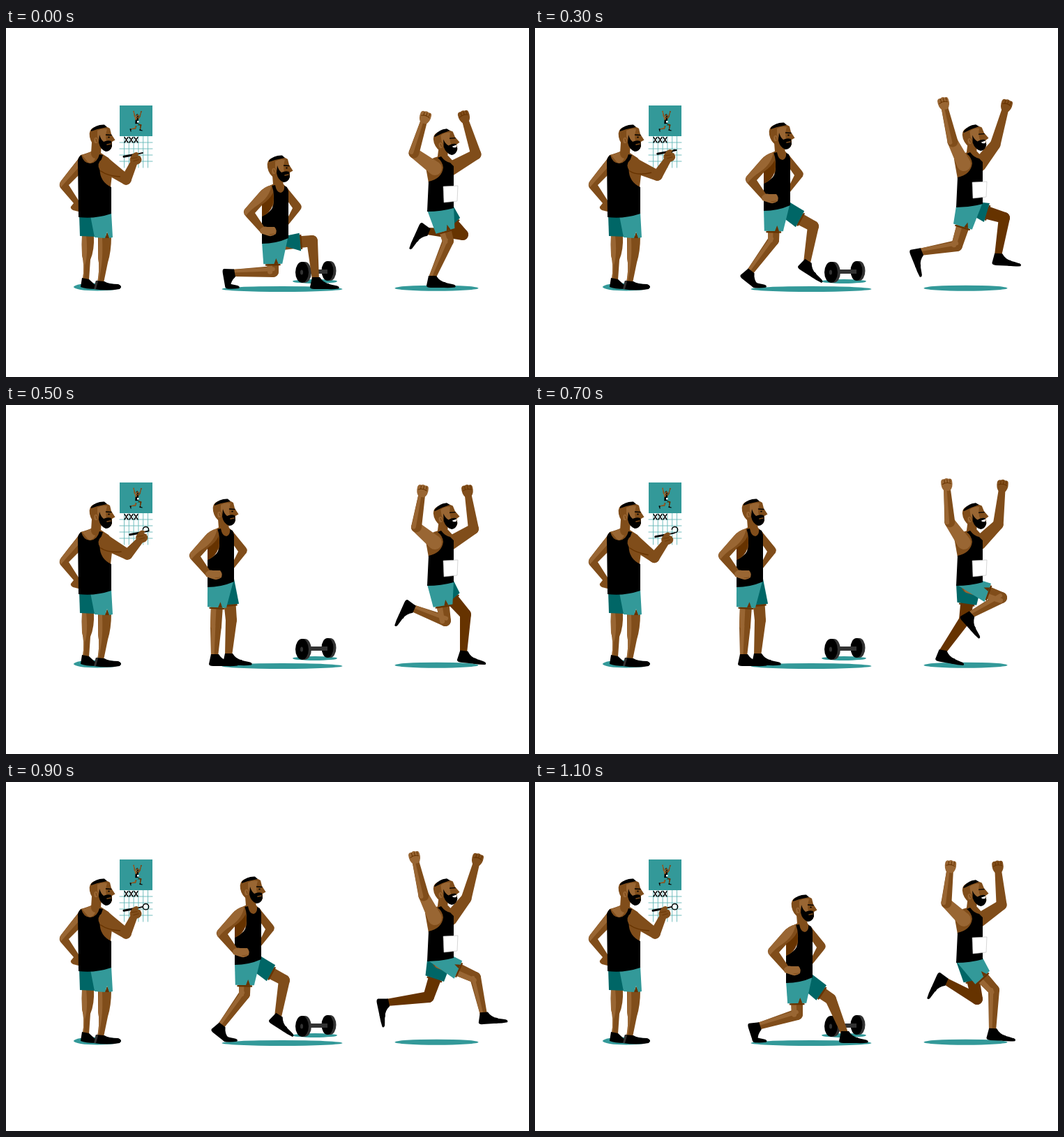
An HTML page for the animation above (1200 ms loop, 750 by 500 pixels).

```html
<!DOCTYPE html>
<html lang="en">
<head>
<meta charset="utf-8">
<title>Training routine</title>
<style>
html, body { margin: 0; width: 100%; height: 100%; overflow: hidden; background: #fff; }
svg { display: block; width: 100vw; height: 100vh; }
</style>
</head>
<body>
<svg id="stage" viewBox="0 0 750 500"></svg>
<script>
const LIGHT = '#996633', MID = '#804d1a', DARK = '#663300';
const TEAL = '#339999', DEEP = '#006666', BLACK = '#000', GREY = '#333';
const STEP_MS = 100, STEPS = 12;

// ---- drawing helpers ----
const path = (d, fill) => `<path d="${d}" fill="${fill}"/>`;
const line = (d, color, width) =>
  `<path d="${d}" fill="none" stroke="${color}" stroke-width="${width}" stroke-linecap="round"/>`;
const oval = (x, y, rx, ry, fill) => `<ellipse cx="${x}" cy="${y}" rx="${rx}" ry="${ry}" fill="${fill}"/>`;
const group = (transform, body) => `<g transform="${transform}">${body}</g>`;
const move = (x, y, body) => group(`translate(${x} ${y})`, body);
const mix = (a, b, k) => a.map((v, i) => v + (b[i] - v) * k);
const along = (p, dir, k) => [p[0] + dir[0] * k, p[1] + dir[1] * k];
const poly = points => 'M' + points.map(p => p.map(v => v.toFixed(2)).join(' ')).join('L') + 'Z';

function axes(a, b) {
  const dx = b[0] - a[0], dy = b[1] - a[1], length = Math.hypot(dx, dy);
  return { dir: [dx / length, dy / length], side: [-dy / length, dx / length] };
}

function taper(a, b, ra, rb, fill) {
  const { side } = axes(a, b);
  return path(`M${along(a, side, ra)}L${along(b, side, rb)}A${rb} ${rb} 0 0 0 ${along(b, side, -rb)}` +
    `L${along(a, side, -ra)}A${ra} ${ra} 0 0 0 ${along(a, side, ra)}Z`, fill);
}

function stripe(a, b, ra, rb, fill) {
  const { side } = axes(a, b);
  return taper(along(a, side, ra * .55), along(b, side, rb * .55), ra * .45, rb * .45, fill);
}

// ---- body parts ----
// The toe turns at the ball of the foot, so a raised heel can leave the toe on the floor.
function shoe(ankle, angle, toeAngle) {
  const heel = 'M-5-3L-8 11Q-8 14 -2 14L17 14L19 6.5Q11 5 6-3Z';
  const toe = group(`translate(17 10) rotate(${toeAngle - angle})`,
    path('M-2-4Q8-2 14-.5Q18 1 16 3.5Q8 4.5 0 4Z', BLACK) + oval(0, 0, 4, 4, BLACK));
  return group(`translate(${ankle}) rotate(${angle})`, path(heel, BLACK) + toe);
}

function leg({ hip, knee, ankle, angle }, radii, skin, highlight, toeAngle = angle) {
  const [top, mid, low] = radii;
  return taper(hip, knee, top, mid, skin) + taper(knee, ankle, mid, low, skin) +
    (highlight ? stripe(hip, knee, top, mid, highlight) + stripe(knee, ankle, mid * .8, low, highlight) : '') +
    shoe(ankle, angle, toeAngle);
}

function shortsLeg({ hip, knee }, waistLeft, waistRight, reach, width, fill, notch) {
  const { dir, side } = axes(hip, knee);
  const cuff = along(hip, dir, reach);
  const left = along(cuff, side, width), right = along(cuff, side, -width);
  const shade = poly([left, right, along(right, dir, 3), along(left, dir, 3)].map(p => mix(p, cuff, .2)));
  const cut = along(cuff, side, -width * .35);
  return path(shade, DARK) + path(poly([waistLeft, waistRight, right, left]), fill) +
    (notch ? path(poly([along(cut, side, 3), along(cut, dir, -8), along(cut, side, -3)]), DARK) : '');
}

function head(smile) {
  return path('M297 152Q295 141 304 138Q318 134 326 140L328 148L333.5 156.5L329 159L329 166Q326 173 319 172' +
      'Q311 168 309 162L307 167Q299 162 297 152Z', MID) +
    path('M308 143Q315 139 322 141Q319 150 321 158L316 160L311 157L308 152Z', LIGHT) +
    path('M299 142Q306 134 318 134.5L322 138Q310 140 299 144Z', BLACK) +
    path('M311 149Q313 156 317 159Q323 156 328 158L329 165Q327 173 320 173Q312 170 310 160Z', BLACK) +
    oval(306, 157, 2.8, 4.2, LIGHT) + line('M306 155L307 159', DARK, .8) +
    line('M320.5 149L328 149.5', BLACK, 1.4) +
    (smile ? path('M322 161L329 159.5L328 162.5Q324 164 322 161Z', '#fff')
           : oval(324.5, 152.5, 1.3, 1.1, BLACK) + line('M322 163L327 162', MID, 1.6));
}

// ---- planner ----
function calendar() {
  let grid = '', crosses = '';
  for (let i = 0; i < 6; i++) grid += `M${169.5 + i * 6.8} 155V200`;
  for (let i = 0; i < 4; i++) grid += `M163 ${164 + i * 9}H210`;
  for (let i = 0; i < 3; i++) crosses += `M${170 + i * 7} 156.5l5 7.5m0-7.5l-5 7.5`;
  return line(grid, '#66b8b8', .9) + line(crosses, BLACK, 1.4) +
    `<rect x="163" y="111" width="47" height="44" fill="${TEAL}"/>` +
    group('translate(114 107) scale(.118)', runner(3));
}

function elbowOf(a, c, upper, lower) {
  const { dir, side } = axes(a, c);
  const span = Math.hypot(c[0] - a[0], c[1] - a[1]);
  const x = (upper * upper - lower * lower + span * span) / (2 * span);
  return along(along(a, dir, x), side, Math.sqrt(Math.max(0, upper * upper - x * x)));
}

function penArm(step) {
  const turn = Math.min(step / 9, 1), angle = Math.PI * (1 + 2 * turn);
  const tip = [200.5 + 4.5 * Math.cos(angle), 178.7 + 4.5 * Math.sin(angle)];
  const wrist = [tip[0] - 12, tip[1] + 13], shoulder = [143, 197];
  const elbow = elbowOf(shoulder, wrist, 35.5, 28);
  const ring = `<circle cx="200.5" cy="178.7" r="4.2" fill="none" stroke="#000" stroke-width="1.4"
    pathLength="1" stroke-dasharray="${turn} 2" transform="rotate(180 200.5 178.7)"/>`;
  return (turn ? ring : '') +
    taper(shoulder, elbow, 10.5, 7.5, MID) + taper(elbow, wrist, 7.5, 5, MID) +
    line(`M136 205Q146 212 ${along(elbow, [-9, -4], 1)}`, DARK, 1.5) +
    move(tip[0], tip[1],
      oval(-10, 10, 8.5, 7, MID) +
      line('M-27 5.5L-8 2', BLACK, 3) + line('M-8 2L0 .2', BLACK, 1.8) +
      path('M-18 8Q-15 0-9-1L-5 1L-8 4L-3 5Q-3 10-8 12L-16 13Z', MID) +
      line('M-16 8L-8 7M-13 12L-6 10', DARK, .8));
}

function planner(step) {
  return oval(131, 371, 34, 5.5, TEAL) +
    path('M109 296L126 297Q127 318 121 332L119 361L110 361Q113 340 109 325Q108 310 109 296Z', MID) +
    path('M109 297L115 297Q118 325 113 340L112 361L110 361Q113 340 109 325Z', LIGHT) +
    path('M109 358L119 360L131 371L128 374Q114 374 107 371Z', BLACK) +
    path('M132 298L151 298Q151 320 146 336L140 365L131 365Q135 345 132 328Z', MID) +
    path('M133 300L138 300Q139 325 137 340L133 365L131 365Q135 345 132 328Z', LIGHT) +
    path('M129 362L141 363Q147 367 161 367Q168 370 163 374Q145 377 126 374Z', BLACK) +
    path('M129 362L132 363L129 374L126 374Z', GREY) +
    path('M105 268L128 270L128 299L106 298Z', DEEP) +
    path('M142 301L145 292L149 301Z', DARK) +
    path('M121 269L151 264L153 300L148 301L145 292L142 301L127 300Z', TEAL) +
    path('M104 187Q92 202 79 219Q75 224 78 229L97 251L93 256Q92 259 96 261L104 263L104 247L90 225L104 211Z', MID) +
    path('M104 188Q93 201 79 219Q75 224 79 228L86 220L104 200Z', LIGHT) +
    path('M107 182Q118 179 124 176L136 179L147 186L154 194L150 228L104 215L103 188Z', MID) +
    path('M109 182Q119 180 125 175L132 180Q126 194 119 194Z', LIGHT) +
    taper([130, 164], [129, 180], 7, 7, MID) +
    path('M108 182Q111 194 121 194Q131 193 134 181L139 182Q126 216 151 228L151 266Q127 274 104 271' +
      'L103 190Q104 184 108 182Z', BLACK) +
    penArm(step) + move(-177, 4, head(false));
}

// ---- lunger ----
// Body offset, then knee, ankle and foot angle of the near and far leg.
const LUNGE = [
  [0, [78, 48, 383, 349, 325, 351, 80, 439, 305, 444, 360, 0]],
  [1, [71, 27, 376, 333, 320, 350, 72, 424, 311, 444, 360, 0]],
  [3, [39, 1, 342, 304, 308, 350, 38, 399, 284, 390, 336, 32]],
  [5, [0, 0, 301, 317, 299, 360, 0, 323, 308, 319, 359, 0]]
];

function sample(keys, step) {
  const next = keys.findIndex(k => k[0] > step);
  const from = keys.at(next < 0 ? -1 : next - 1);
  if (from[0] === step) return from[1];
  const to = next < 0 ? [keys[0][0] + STEPS, keys[0][1]] : keys[next];
  return mix(from[1], to[1], (step - from[0]) / (to[0] - from[0]));
}

const limb = (hip, v) => ({ hip, knee: [v[0], v[1]], ankle: [v[2], v[3]], angle: v[4] });

function lunger(step) {
  const pose = sample(LUNGE, Math.min(step, STEPS - step, 5));
  const [x, y] = pose;
  const near = limb([304 + x, 259 + y], pose.slice(2, 7));
  const far = limb([319 + x, 261 + y], pose.slice(7, 12));
  const waist = [[289 + x, 258 + y], [327 + x, 249 + y]];
  const radii = [9, 8, 5];
  const body =
    path('M326 182L344 204Q348 209 343 214L326 235L327 222L333 210L326 200Z', MID) +
    path('M300 178L308 174L320 176L327 183L326 195L305 212Z', MID) +
    taper([311, 163], [313, 182], 7, 7.5, MID) +
    path('M303 178L308 177Q310 188 316 188Q322 186 321 178L325 180L327 186L327 253Q309 261 289 261' +
      'L289 220Q306 216 306 200Z', BLACK) +
    path('M303 177Q291 180 285 188L264 212Q261 217 266 222L287 245L293 238L279 217L289 206L289 222' +
      'Q302 217 305 204Q308 190 303 177Z', MID) +
    path('M289 205Q300 198 305 188Q307 198 304 206Q300 217 289 222Z', DARK) +
    path('M303 177Q291 180 285 188L264 212Q262 217 266 221Q273 212 284 205Q300 194 303 177Z', LIGHT) +
    path('M286 241Q290 235 297 237L307 237Q311 241 309 247Q303 252 296 249L287 246Z', LIGHT) +
    line('M300 248L307 247', MID, 1) + head(false);
  return leg(far, radii, MID) + shortsLeg(far, [300 + x, 258 + y], waist[1], 25, 13, DEEP) +
    leg(near, radii, MID, LIGHT, 0) + shortsLeg(near, ...waist, 31, 13.5, TEAL, true) + move(x, y, body);
}

function dumbbell() {
  const plate = (x, y, rx, ry) => oval(x + 4, y, rx, ry, GREY) +
    `<rect x="${x}" y="${y - ry}" width="4" height="${2 * ry}" fill="${GREY}"/>` + oval(x, y, rx, ry, BLACK);
  return oval(443, 363, 32, 3, TEAL) + plate(461, 348, 8.5, 14) +
    `<rect x="433" y="346" width="28" height="6" fill="${GREY}"/>` +
    plate(424.5, 350, 9.5, 15) + oval(424, 350, 2, 3.5, GREY);
}

// ---- runner ----
// Body drop, arm bend, then knee, ankle and foot angle of the near and far leg.
const RUN = [
  [0, [4, 1, 634, 305, 611, 358, 0, 655, 296, 604, 291, 114]],
  [1, [2, .5, 608, 313, 570, 350, 22, 671, 276, 629, 304, 40]],
  [3, [-2, 0, 605, 312, 552, 321, 68, 673, 272, 664, 326, 3]],
  [5, [0, .75, 630, 309, 583, 291, 114, 659, 300, 656, 355, 6]],
  [6, [3, 1, 655, 296, 604, 291, 114, 634, 305, 611, 358, 0]],
  [7, [0, .3, 669, 276, 624, 301, 48, 616, 308, 584, 354, 10]],
  [9, [-2, 0, 673, 280, 685, 333, -4, 606, 308, 546, 316, 78]],
  [11, [0, .65, 658, 298, 656, 356, 3, 634, 311, 588, 285, 114]]
];

function raisedArm(shoulder, elbow, fist, lit) {
  const tilt = Math.atan2(fist[0] - elbow[0], elbow[1] - fist[1]) * 180 / Math.PI;
  return taper(shoulder, elbow, 10, 7.5, lit ? LIGHT : MID) + taper(elbow, fist, 7.5, 4.5, MID) +
    (lit ? stripe(fist, elbow, 4.5, 7, LIGHT) : '') +
    group(`translate(${fist}) rotate(${tilt})`,
      path('M-8-5Q-7-9-3-8Q0-10 3-8Q8-9 8-4Q9 4 4 9L-4 9Q-9 4-8-5Z', lit ? LIGHT : MID) +
      line('M-6-1Q0-4 6-1M-3-7V-3M1-7V-3M5-7V-3', DARK, 1));
}

function runner(step) {
  const pose = sample(RUN, step);
  const [drop, bend] = pose;
  const near = limb([622, 259 + drop], pose.slice(2, 7));
  const far = limb([623, 259 + drop], pose.slice(7, 12));
  const waist = [[604, 257 + drop], [642, 252 + drop]];
  const radii = [10.5, 8, 5];
  const body =
    path('M601 190Q610 182 620 180L634 179L644 190L641 208L606 218Z', MID) +
    taper([627, 168], [626, 184], 6.5, 7.5, MID) +
    path('M619 182L624 180Q630 188 637 189L642 194L642 254Q624 259 604 259L606 216Q625 212 627 196' +
      'Q626 187 619 182Z', BLACK) +
    '<path d="M627 223L648 222L647 244L628 246Z" fill="#fff" stroke="#bbb" stroke-width=".6"/>' +
    group('translate(317 6) rotate(-8 314 155)', head(true));
  return raisedArm([637, 198 + drop], mix([660, 167], [674, 181], bend), mix([676, 111], [657, 127], bend)) +
    leg(far, radii, DARK) + shortsLeg(far, ...waist, 26, 14, DEEP) +
    leg(near, radii, MID, LIGHT) + shortsLeg(near, ...waist, 29, 14, TEAL, true) +
    move(0, drop, body) +
    raisedArm([615, 197 + drop], mix([599, 163], [585, 179], bend), mix([586, 108], [601, 128], bend), true);
}

// ---- playback ----
const stage = document.getElementById('stage');
const backdrop = calendar();
const floor = oval(396, 374, 86.5, 4, TEAL) + oval(617.5, 372.7, 60, 4, TEAL) + dumbbell();
let start = null, shown = -1;

function draw(now) {
  start ??= now;
  const step = Math.floor((now - start) / STEP_MS) % STEPS;
  if (step !== shown) {
    stage.innerHTML = backdrop + floor + planner(step) + lunger(step) + runner(step);
    shown = step;
  }
  requestAnimationFrame(draw);
}
requestAnimationFrame(draw);
</script>
</body>
</html>
```
